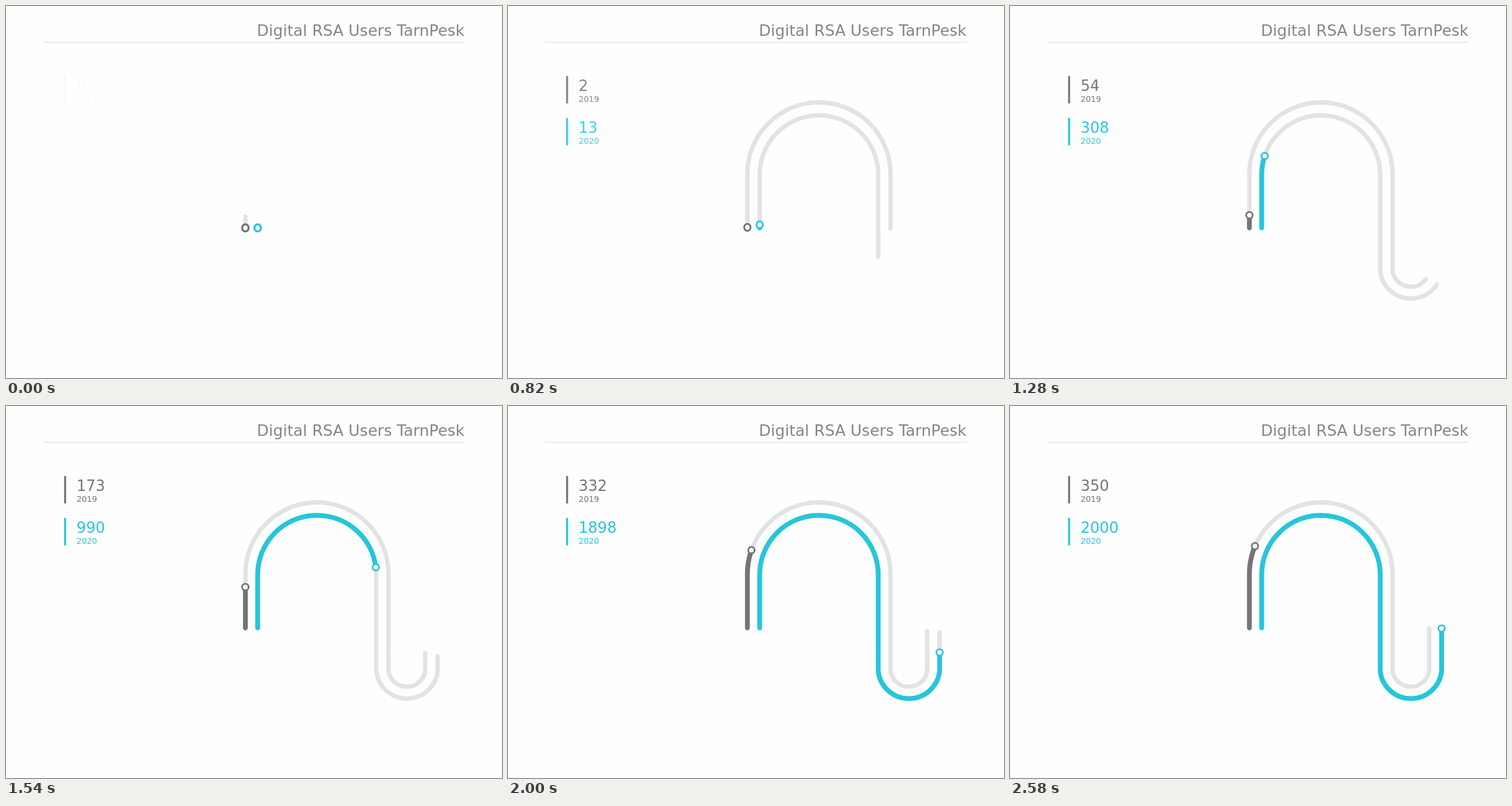
Write an HTML page that moves like this. It is 864x648 px and loops after 6.82 s.

```html
<!DOCTYPE html>
<html lang="en">
<head>
<meta charset="utf-8">
<title>Digital users</title>
<style>
  html, body { margin: 0; width: 100%; height: 100%; overflow: hidden; background: #fefefe; }
  svg { display: block; width: 100vw; height: 100vh; font-family: "DejaVu Sans", sans-serif; }
  .title { font-size: 27px; fill: #80868b; }
  .rule { stroke: #e2e6e8; stroke-width: 1.5; }
  .count { font-size: 26px; }
  .year { font-size: 14px; }
  .legend { fill: currentColor; }
  .track, .value { fill: none; stroke-linecap: round; }
  .track { stroke: #e2e3e3; stroke-width: 7.6; }
  .value { stroke: currentColor; stroke-width: 8.4; }
  .marker { fill: #fefefe; stroke: currentColor; }
  .y2019 { color: #757575; }
  .y2020 { color: #26c6da; }
</style>
</head>
<body>
<svg id="stage" viewBox="0 0 864 648">
  <text class="title" x="437" y="52">Digital RSA Users TarnPesk</text>
  <line class="rule" x1="65" y1="63" x2="799" y2="63"/>
</svg>
<script>
const LOOP = 6820, STEP = 20, DURATION = 2500, VALUE_START = 292.4;
const MAX = 2000, MARKER_RADIUS = 5.6;
const stage = document.getElementById('stage');

const series = [
  { year: 2019, total: 350, start: -20, top: 0, left: 417, right: 666.3, far: 730.2, base: 292.5, bend: 32.4 },
  { year: 2020, total: 2000, start: 20, top: 73, left: 438.4, right: 644.9, far: 751.8, base: 293.7, bend: 53.8 }
];

function add(parent, tag, attrs, text = '') {
  const node = document.createElementNS(stage.namespaceURI, tag);
  for (const key in attrs) node.setAttribute(key, attrs[key]);
  node.textContent = text;
  return parent.appendChild(node);
}

function pipe({ left, right, far, base, bend }) {
  const arch = (right - left) / 2;
  return `M${left} 386.5V${base}A${arch} ${arch} 0 0 1 ${right} ${base}` +
    `V462A${bend} ${bend} 0 0 0 ${far} 462V387.5`;
}

for (const s of series) {
  s.group = add(stage, 'g', { class: 'y' + s.year });
  s.legend = add(s.group, 'g', { class: 'legend', transform: `translate(0 ${s.top})` });
  add(s.legend, 'rect', { x: 101.2, y: 121.5, width: 3.5, height: 48.5, rx: 1.7 });
  s.count = add(s.legend, 'text', { class: 'count', x: 123, y: 148 }, '0');
  add(s.legend, 'text', { class: 'year', x: 123, y: 167 }, s.year);
  s.track = add(s.group, 'path', { class: 'track', d: pipe(s) });
  s.value = add(s.group, 'path', { class: 'value', d: pipe(s) });
  s.marker = add(s.group, 'ellipse', { class: 'marker', rx: MARKER_RADIUS });
  s.length = s.track.getTotalLength();
}

const progress = (time, start) => Math.min(1, Math.max(0, (time - start) / DURATION));
const easeOut = (x, power) => 1 - (1 - x) ** power;
const easeInOut = x => x < 0.5 ? 16 * x ** 5 : 1 - 16 * (1 - x) ** 5;

function reveal(path, length) {
  path.style.visibility = length > 0 ? 'visible' : 'hidden';
  path.setAttribute('stroke-dasharray', `${length} 2000`);
}

function draw(time) {
  const shown = easeInOut(progress(time, VALUE_START));
  for (const s of series) {
    const intro = progress(time, s.start);
    const fade = easeOut(intro, 5);
    s.legend.setAttribute('opacity', fade);
    s.count.textContent = Math.round(s.total * shown);
    reveal(s.track, s.length * easeOut(intro, 3));

    const reach = s.length * shown * s.total / MAX;
    reveal(s.value, reach);
    const tip = s.value.getPointAtLength(reach);
    s.marker.setAttribute('cx', tip.x);
    s.marker.setAttribute('cy', tip.y);
    // markers start heavy and slightly tall, then settle into thin round rings
    s.marker.setAttribute('stroke-width', 3 + 0.7 * (1 - fade));
    s.marker.setAttribute('ry', MARKER_RADIUS + 0.5 * Math.max(0, 1 - 6.5 * shown));
  }
}

const begin = performance.now();
function tick() {
  const time = (performance.now() - begin) % LOOP;
  draw(Math.floor(time / STEP) * STEP);
  requestAnimationFrame(tick);
}
tick();
</script>
</body>
</html>
```
